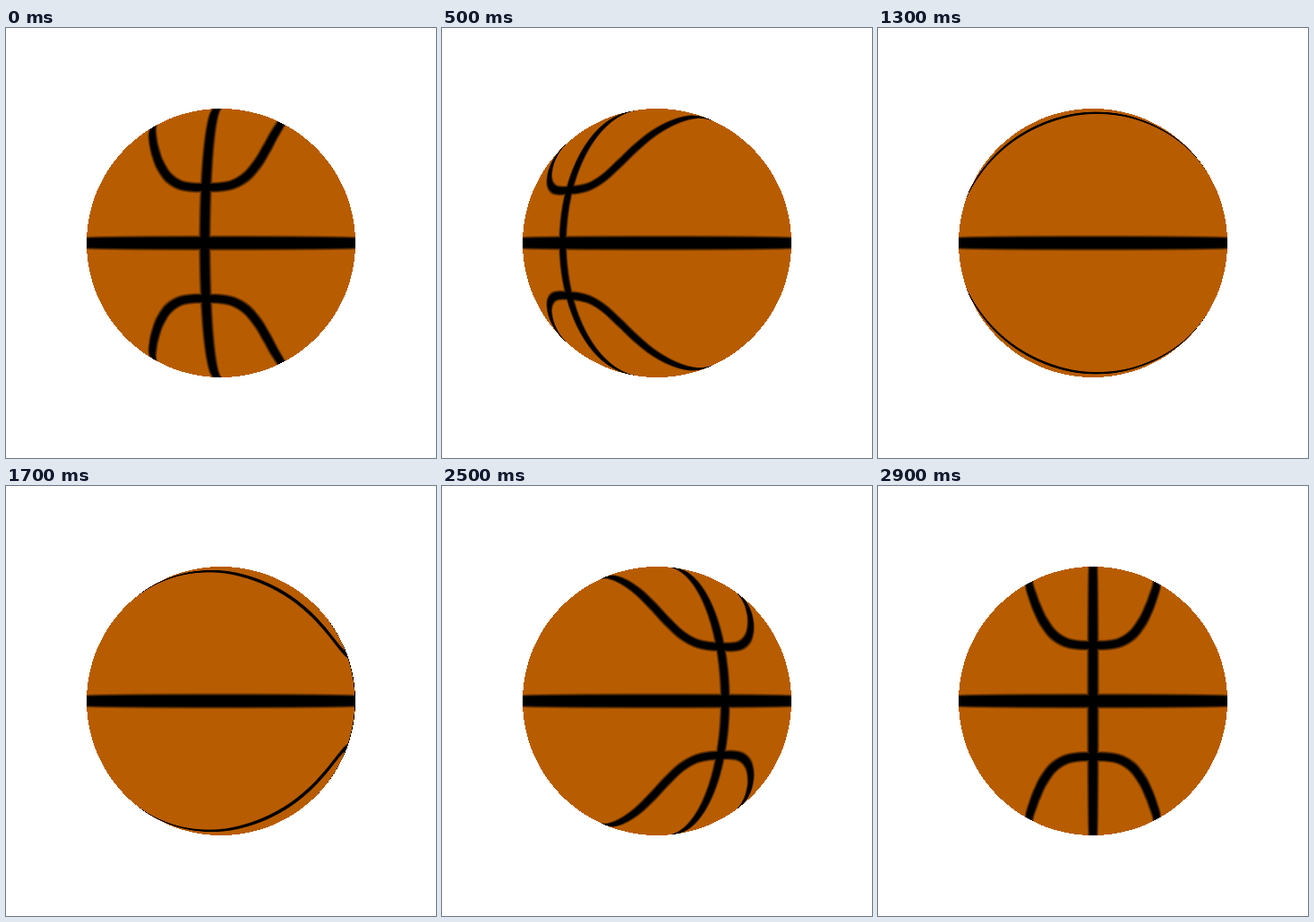
An HTML page with a canvas for the animation above (3000 ms loop, 480 px wide and 480 px high).

```html
<!DOCTYPE html>
<html lang="en">
<head>
<meta charset="utf-8">
<title>Spinning basketball</title>
<style>
  html, body { margin: 0; width: 100%; height: 100%; overflow: hidden; background: #fff; }
  canvas { display: block; width: 480px; height: 480px; }
</style>
</head>
<body>
<canvas id="stage" width="480" height="480"></canvas>
<script>
const SIZE = 480, CENTER = 240, RADIUS = 150;
const CAMERA = 4.15;                 // eye distance in ball radii
const STEPS = 30, STEP_MS = 100;
const START = -5.42, TURN = -6.02;   // degrees
const COLOR = [184, 92, 0];
const EQUATOR = 0.039, MERIDIAN = 0.0305, SEAM = 0.029, SOFT = 0.019;
const DEG = Math.PI / 180;

// Curved seam: longitude, latitude in degrees; mirrored at 0 and at 90
const KNOTS = [
  [0, 19.3], [5, 19.4], [10, 20.5], [15, 23.6], [20, 28.8], [26, 36], [32, 42.4],
  [38, 47.4], [45, 51.9], [54, 56.2], [66, 60.1], [78, 62], [90, 62.5]
];

const slopes = KNOTS.map((k, i) => {
  const a = KNOTS[i - 1], b = KNOTS[i + 1];
  return a && b ? (b[1] - a[1]) / (b[0] - a[0]) : 0;
});

function seamLat(lon) {
  let i = 0;
  while (i < KNOTS.length - 2 && lon > KNOTS[i + 1][0]) i++;
  const [x0, y0] = KNOTS[i], [x1, y1] = KNOTS[i + 1];
  const w = x1 - x0, t = (lon - x0) / w, t2 = t * t, t3 = t2 * t;
  return y0 * (2 * t3 - 3 * t2 + 1) + y1 * (3 * t2 - 2 * t3) +
    w * (slopes[i] * (t3 - 2 * t2 + t) + slopes[i + 1] * (t3 - t2));
}

// Seam lookup over one quarter turn
const CELLS = 1800;
const seam = new Float32Array(CELLS + 1), seamSlope = new Float32Array(CELLS + 1);
for (let i = 0; i <= CELLS; i++) seam[i] = seamLat(i * 90 / CELLS) * DEG;
for (let i = 0; i <= CELLS; i++) {
  const a = Math.max(0, i - 1), b = Math.min(CELLS, i + 1);
  seamSlope[i] = (seam[b] - seam[a]) / ((b - a) * 90 / CELLS * DEG);
}

// Visible surface points, found by casting a ray through each pixel
const points = [];
const focal2 = CAMERA * CAMERA - 1, focal = Math.sqrt(focal2);
for (let y = 0; y < SIZE; y++) {
  for (let x = 0; x < SIZE; x++) {
    const u = (x + 0.5 - CENTER) / RADIUS, v = (CENTER - y - 0.5) / RADIUS;
    const r2 = u * u + v * v;
    if (r2 > 1) continue;
    const depth = (CAMERA - Math.sqrt(1 - r2)) / (1 + r2 / focal2);
    const lat = Math.abs(Math.asin(v * depth / focal));
    points.push({
      at: (y * SIZE + x) * 4,
      lon: Math.atan2(u * depth / focal, CAMERA - depth),
      lat,
      cos: Math.cos(lat)
    });
  }
}

const ctx = document.getElementById("stage").getContext("2d");
const image = ctx.createImageData(SIZE, SIZE);
image.data.fill(255);

const ink = (half, dist) => (half - dist) / SOFT + 0.5;

function draw(step) {
  const turn = (START + TURN * step) * DEG;
  const data = image.data;
  for (const p of points) {
    const s = Math.abs(Math.sin(p.lon - turn));
    const cell = Math.round(Math.asin(s) / DEG * CELLS / 90);
    const tilt = seamSlope[cell] / p.cos;
    const seamDist = Math.abs(p.lat - seam[cell]) / Math.sqrt(1 + tilt * tilt);
    const a = Math.max(ink(EQUATOR, p.lat), ink(MERIDIAN, s * p.cos), ink(SEAM, seamDist));
    const light = 1 - Math.min(1, Math.max(0, a));
    for (let c = 0; c < 3; c++) data[p.at + c] = COLOR[c] * light;
  }
  ctx.putImageData(image, 0, 0);
}

const begin = performance.now();
let shown = -1;
function tick() {
  const step = Math.floor((performance.now() - begin) / STEP_MS) % STEPS;
  if (step !== shown) draw(shown = step);
  requestAnimationFrame(tick);
}
tick();
</script>
</body>
</html>
```
